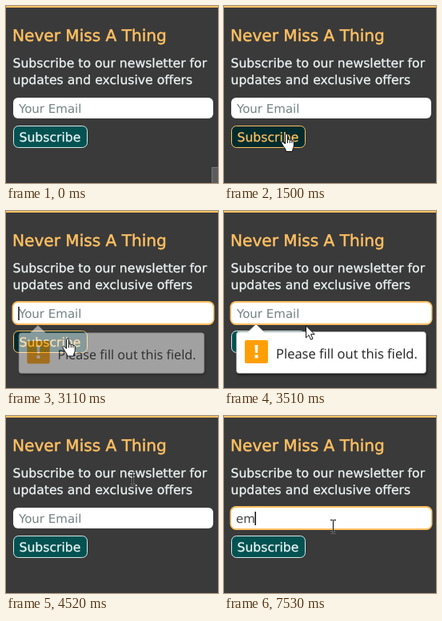
An HTML page for the animation above (8000 ms loop, 265 px wide and 222 px high).

```html
<!DOCTYPE html>
<html lang="en">
<head>
<meta charset="utf-8">
<title>Newsletter form</title>
<style>
  html, body { margin: 0; width: 100%; height: 100%; overflow: hidden; background: #3a3a3a; }
  svg { display: block; width: 265px; height: 222px; }
  text { font: 15.65px "DejaVu Sans", sans-serif; fill: #edf6f6; stroke: #edf6f6; stroke-width: .25; text-rendering: geometricPrecision; }
  .heading { font-size: 20.1px; fill: #ffc062; stroke: #ffc062; stroke-width: .5; }
  .field { font-size: 15px; fill: #738383; stroke: none; }
  #typed { fill: #444; }
  #button rect { fill: #045252; stroke: #d5eaea; }
  #button.hover rect { fill: #022c2e; stroke: #ffc062; }
  #button.hover text { fill: #ffc062; stroke: #ffc062; }
  #tip { filter: drop-shadow(1.5px 2px 1.5px rgba(0, 0, 0, .5)); }
  #tip text { font: 16.55px "Open Sans", sans-serif; fill: #222; stroke: none; }
</style>
</head>
<body>
<svg viewBox="0 0 265 222">
  <rect width="265" height="222" fill="#3a3a3a"/>
  <rect width="265" height="2" fill="#ffc062"/>
  <text class="heading" x="8" y="44">Never Miss A Thing</text>
  <text x="8.5" y="77">Subscribe to our newsletter for</text>
  <text x="8.5" y="98">updates and exclusive offers</text>

  <rect id="focus" x="7.5" y="113" width="253" height="30" rx="7.5" fill="#ffc062"/>
  <rect x="9" y="115" width="250" height="26" rx="6" fill="#fff"/>
  <text id="placeholder" class="field" x="16" y="134">Your Email</text>
  <text id="typed" class="field" x="15" y="134">em</text>
  <rect id="caret" y="120" width="1.5" height="17" fill="#111"/>

  <g id="button">
    <rect x="9.5" y="150.5" width="92" height="27" rx="6"/>
    <text x="16.5" y="170">Subscribe</text>
  </g>

  <g id="corner">
    <rect x="257" y="202" width="8" height="20" fill="#777"/>
    <rect x="258" y="203" width="7" height="19" fill="#5c5c5c"/>
  </g>

  <g id="tip">
    <path d="M19 151.5H30L40 142L50 151.5H249Q252.500 151.500 252.500 155V200Q252.500 203.500 249 203.500H19Q15.500 203.500 15.500 200V155Q15.500 151.500 19 151.500Z" fill="#fff" stroke="#aaa" stroke-width=".6"/>
    <rect x="26" y="162" width="29" height="29" rx="2" fill="#ff9f05"/>
    <path d="M38.500 168h4l-.5 10h-3zM38.500 180.500h4v4h-4z" fill="#fff"/>
    <text x="65" y="185">Please fill out this field.</text>
  </g>

  <circle id="ring" r="15" fill="#e1e128" fill-opacity=".8"/>

  <g id="arrow" fill="#fff" stroke="#111">
    <path d="M.5 1V16L4 12.700L6.500 18.300L9 17.200L6.600 11.700H11.300Z"/>
  </g>
  <g id="hand" fill="#fff" stroke="#111">
    <path d="M5 1.800C5 0 8 0 8 1.800V8C8 7 10.800 7 10.800 8.600C11 7.600 13.400 7.800 13.400 9.400C13.600 8.600 15.800 8.800 15.800 10.600V15C15.800 18 14 19 14 22.500H6C6 19.500 4 18 2.500 15.500L.5 12C-.3 10.500 1.800 9.600 3 11L5 13Z"/>
    <path d="M8 8v4M10.800 8.600V12M13.400 9.400V12" fill="none"/>
  </g>
  <g id="beam" fill="none">
    <path d="M-3.500 -8H-1Q0 -8 0 -7V7Q0 8 -1 8H-3.500M3.500 -8H1Q0 -8 0 -7M0 7Q0 8 1 8H3.500" stroke="#ddd" stroke-opacity=".65" stroke-width="2"/>
    <path d="M-3.500 -8H-1Q0 -8 0 -7V7Q0 8 -1 8H-3.500M3.500 -8H1Q0 -8 0 -7M0 7Q0 8 1 8H3.500" stroke="#111"/>
  </g>
</svg>
<script>
const LOOP = 8000;
const el = id => document.getElementById(id);
const show = (id, on) => el(id).setAttribute("visibility", on ? "visible" : "hidden");
const place = (id, x, y) => el(id).setAttribute("transform", `translate(${x} ${y})`);
const within = (t, ...spans) => spans.some(([from, to]) => t >= from && t < to);
const latest = (steps, t) => steps.filter(step => step[0] <= t).pop();

// start time, shape, x, y
const pointer = [
  [0, "none", 0, 0],
  [490, "arrow", 171, 196],
  [700, "arrow", 160, 182],
  [900, "arrow", 157, 180],
  [1500, "hand", 71.5, 160],
  [2910, "hand", 70.5, 159.5],
  [3510, "arrow", 102, 143],
  [3710, "beam", 121.5, 121.5],
  [3910, "beam", 143.5, 96.5],
  [4110, "beam", 158.5, 80],
  [4310, "beam", 158.5, 78.5],
  [5120, "beam", 153.5, 95.5],
  [5320, "beam", 142.5, 124.5],
  [5520, "beam", 136.5, 138.5]
];

// start time, opacity, scale, drop
const tipSteps = [[0, 0, 1, 0], [3110, .52, .978, 1.5], [3310, .88, .991, .6], [3510, 1, 1, 0], [4520, 0, 1, 0]];

function render(t) {
  const [, shape, x, y] = latest(pointer, t);
  for (const id of ["arrow", "hand", "beam"]) show(id, id === shape);
  if (shape !== "none") place(shape, x, y);

  const [, opacity, scale, drop] = latest(tipSteps, t);
  el("tip").setAttribute("opacity", opacity);
  el("tip").setAttribute("transform", `translate(40 ${142 + drop}) scale(${scale}) translate(-40 -142)`);

  const typed = t >= 7530;
  show("typed", typed);
  show("placeholder", !typed);
  show("focus", within(t, [2910, 4520], [5730, LOOP]));
  show("caret", within(t, [2910, 3510], [3910, 4520], [5730, 6530], [6930, LOOP]));
  el("caret").setAttribute("x", typed ? 38.5 : 15.2);

  show("ring", within(t, [2700, 3110], [5730, 6130]));
  place("ring", ...(t < 4000 ? [75, 160] : [134, 138]));
  show("corner", t < 100);
  el("button").setAttribute("class", within(t, [1500, 3510]) ? "hover" : "");
}

const start = performance.now();
function tick() {
  render((performance.now() - start) % LOOP);
  requestAnimationFrame(tick);
}
tick();
</script>
</body>
</html>
```
